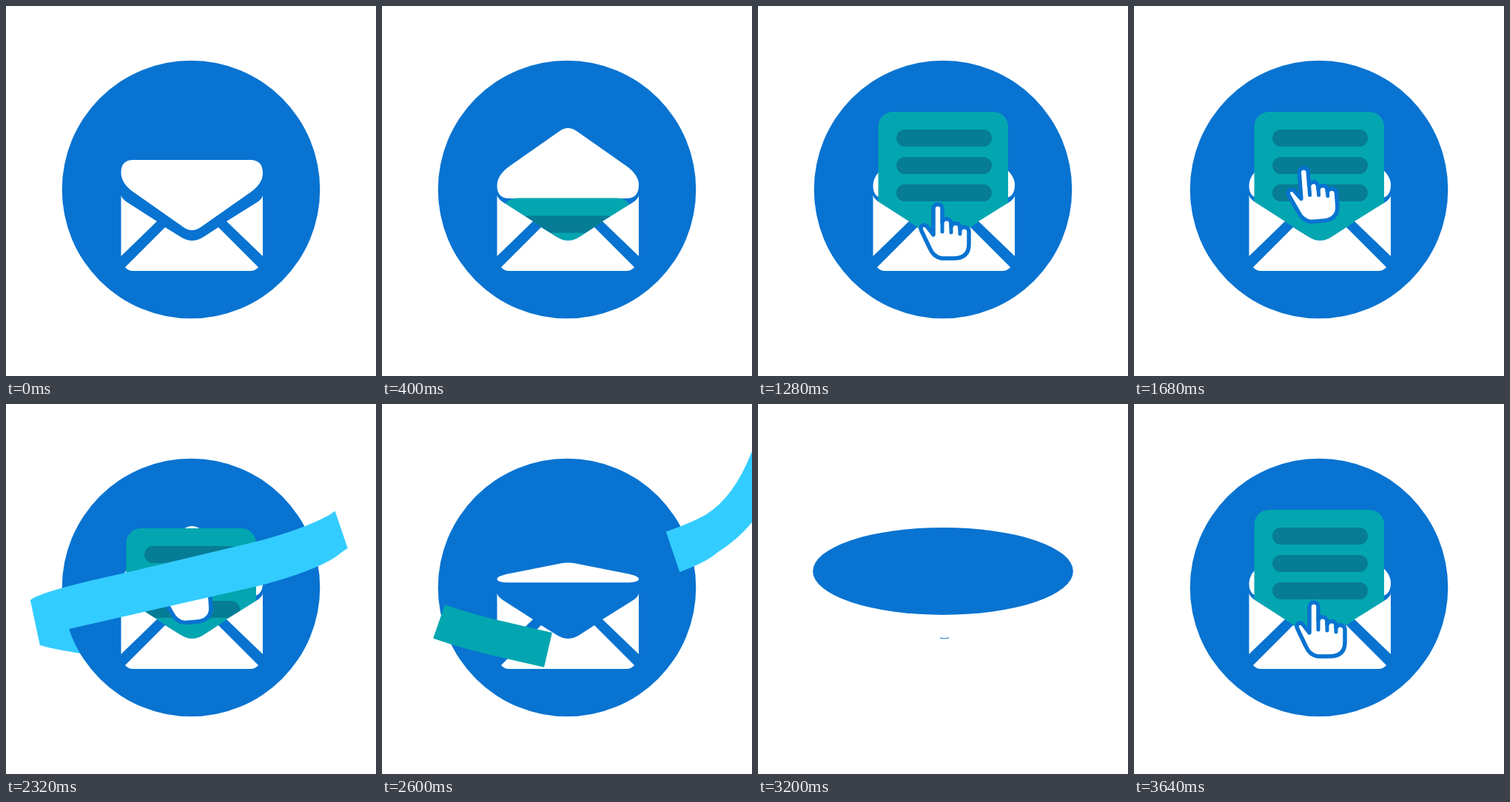
These frames come from a looping animation (500 by 500 pixels, 3.68 s). An HTML page with a canvas:

```html
<!DOCTYPE html>
<html lang="en">
<head>
<meta charset="utf-8">
<title>Mail</title>
<style>
  html, body { margin: 0; width: 100%; height: 100%; overflow: hidden; background: #fff; }
  canvas { display: block; }
</style>
</head>
<body>
<canvas id="stage" width="500" height="500"></canvas>
<script>
const LOOP = 3680;
const BLUE = '#0873d1', TEAL = '#03a6b0', BAR = '#077c95', CYAN = '#33ccff', WHITE = '#fff';
const ctx = document.getElementById('stage').getContext('2d');

const flap = new Path2D('M172 208H330Q347 208 347 226Q347 240 330 252L263 299Q251 307 240 299L173 252Q155.5 240 155.5 225Q155.5 208 172 208Z');
const pocket = new Path2D('M155.5 256Q157 261 165 266L204 291L155.5 338ZM347 256Q346 261 338 266L298 291L347 338Z' +
  'M161 353L215 299L236 312Q251.5 322 267 312L287 299L341 353Q337 358 330 358H172Q165 358 161 353Z');
const opening = new Path2D('M155 0V256Q157 261 165 266L236 312Q251.5 322 267 312L338 266Q346 261 347 256V0Z');
// Both pointers have their tip at 0,0
const arrow = new Path2D('M0 0V66L19 50L30 76L44 70L33 42L57 39Z');
const arrowNotch = new Path2D('M44 70L33 42L57 39');
const hand = new Path2D('M-6 39V4C-6 -4 6 -4 6 4V22C8 16 18 16 18 25V28C20 22 30 22 30 30V32C33 27 42 28 42 35V52' +
  'Q42 71 21 71H5Q-6 69 -11 57L-22 34C-26 26 -17 23 -13 30Z');
const knuckles = new Path2D('M6 20V35M18 25V36M30 30V38');
const ribbonBack = new Path2D('M33 265L46 326Q70 333 115 339V285Z');
const ribbonFront = new Path2D('M33 265Q46 253 162 228L338 186Q400 170 437 150Q480 124 505 50H560Q520 160 454 200Q430 222 345 245L85 304L46 326Z');
const tailFront = new Path2D('M77 294Q120 309 175 321L300 350Q370 365 384 380');
const tailBack = new Path2D('M384 380Q376 396 300 413');

const ramp = (t, from, to) => Math.min(1, Math.max(0, (t - from) / (to - from)));
const smooth = p => p * p * (3 - 2 * p);
const easeOut = p => p * (2 - p);

function fill(path, color) {
  ctx.fillStyle = color;
  ctx.fill(path);
}

function stroke(path, color, width) {
  if (width <= 0) return;
  ctx.strokeStyle = color;
  ctx.lineWidth = width;
  ctx.stroke(path);
}

function pill(x, y, w, h, r, color) {
  const path = new Path2D();
  path.roundRect(x, y, w, h, r);
  fill(path, color);
}

function isolated(draw) {
  ctx.save();
  draw();
  ctx.restore();
}

function drawEnvelope(open, drop) {
  isolated(() => {
    ctx.translate(0, 234);
    ctx.scale(1, 1 - 2 * open);
    ctx.translate(0, -234);
    fill(flap, WHITE);
  });
  isolated(() => {
    ctx.clip(opening);
    ctx.translate(0, drop);
    pill(162.5, 143, 175.5, 260, 20, TEAL);
    for (const y of [167, 204, 241]) pill(187, y, 129, 23, 11.5, BAR);
  });
  fill(pocket, WHITE);
}

function drawArrow(t) {
  if (t < 840 || t >= 1200) return;
  const p = easeOut(ramp(t, 840, 1200));
  isolated(() => {
    ctx.translate(510 - 267 * p, 475 - 205 * p);
    ctx.lineJoin = 'round';
    fill(arrow, WHITE);
    stroke(arrow, BLUE, 6);
    stroke(arrowNotch, '#1a6078', 6);
  });
}

function drawHand(t, late) {
  if (!late && (t < 1200 || t >= 2480)) return;
  const move = late ? 0 : smooth(ramp(t, 1400, 1640));
  const leave = late ? 0 : ramp(t, 2200, 2320);
  const press = late ? 0 : Math.sin(Math.PI * ramp(t, 1760, 2000));
  const size = (1 - 0.1 * press) * (late ? 1 : 1 - ramp(t, 2360, 2480));
  isolated(() => {
    ctx.translate(243 - 14 * move + 2 * leave, 270 - 49 * move + 4 * leave);
    ctx.rotate(-0.075 * move);
    ctx.scale(size, size);
    ctx.lineJoin = ctx.lineCap = 'round';
    fill(hand, WHITE);
    stroke(hand, BLUE, 5.5);
    stroke(knuckles, BLUE, 5);
  });
}

function drawRibbon(t) {
  const head = 278 + (t - 2240) * 2.08;
  const tail = 33 + (t - 2420) * 2.1;
  if (t < 2120 || tail > 560) return;
  isolated(() => {
    const edge = x => [x - 48, 0, x + 122, 500];
    const [hx, hy, hx2, hy2] = edge(head - 3);
    const [tx, ty, tx2, ty2] = edge(Math.max(-90, tail - 40));
    ctx.beginPath();
    ctx.moveTo(tx, ty);
    ctx.lineTo(hx, hy);
    ctx.lineTo(hx2, hy2);
    ctx.lineTo(tx2, ty2);
    ctx.clip();
    fill(ribbonFront, CYAN);
  });
}

function tailWidth(t) {
  return t < 2540 ? 0 : 48 * (1 - ramp(t, 2640, 2960)) * (t < 2880 ? 1 : 1);
}

function drawTail(path, t, start, end, scale) {
  const length = 350;
  isolated(() => {
    ctx.setLineDash([length * ramp(t, start, end), 1000]);
    stroke(path, TEAL, t > start ? tailWidth(t) * scale : 0);
  });
}

function render(t) {
  const late = t >= 3122;
  const spin = ramp(t, 2920, 3324);
  const turn = Math.cos(2 * Math.PI * spin);
  const lift = Math.sin(Math.PI * spin);
  const settle = Math.sin(Math.PI * ramp(t, 3324, 3560));
  const size = 1 + 0.011 * lift + 0.014 * settle;
  const open = late ? 1 : smooth(ramp(t, 20, 320)) - smooth(ramp(t, 2520, 2720));
  const drop = late ? 0 : 175 * (1 - easeOut(ramp(t, 320, 760)) + ramp(t, 2200, 2520) ** 2);

  ctx.fillStyle = WHITE;
  ctx.fillRect(0, 0, 500, 500);
  if (t >= 2120 && t < 2440) fill(ribbonBack, CYAN);
  drawTail(tailBack, t, 2680, 2740, 0.7);

  isolated(() => {
    ctx.translate(250, 248 - 27 * lift + 3 * settle);
    ctx.scale(size, size * turn);
    ctx.translate(-250, -248);
    ctx.fillStyle = BLUE;
    ctx.beginPath();
    ctx.arc(250, 248, 174.3, 0, 2 * Math.PI);
    ctx.fill();
    if (turn > 0) {
      drawEnvelope(open, drop);
      drawHand(t, late);
    }
  });
  if (turn <= 0) stroke(new Path2D('M246 316Q251.5 318 258 316'), BLUE, 1);

  drawArrow(t);
  drawRibbon(t);
  drawTail(tailFront, t, 2540, 2680, 1);
}

function tick(now) {
  render(now % LOOP);
  requestAnimationFrame(tick);
}
requestAnimationFrame(tick);
</script>
</body>
</html>
```
